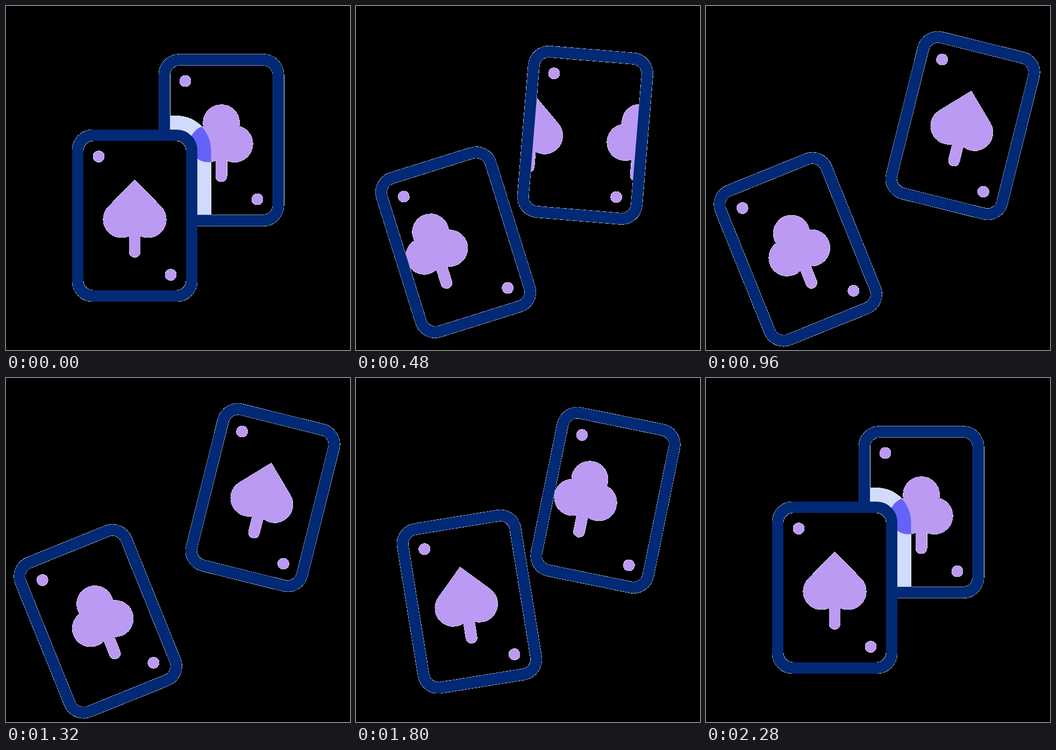
An HTML page with a canvas for the animation above (2360 ms loop, 640 px wide and 640 px high).

```html
<!DOCTYPE html>
<html lang="en">
<head>
<meta charset="utf-8">
<title>Two playing cards</title>
<style>
  html, body { margin: 0; height: 100%; overflow: hidden; background: #000; }
  canvas { display: block; width: 100vw; height: 100vh; }
</style>
</head>
<body>
<canvas id="stage" width="640" height="640"></canvas>
<script>
const SIZE = 640;
const ctx = document.getElementById('stage').getContext('2d', { willReadFrequently: true });

const NAVY = '#022975', LILAC = '#bb9af3', PALE = '#d1daff', VIOLET = '#6462f8';
const LOOP = 2360, STEP = 40, LAST = 2280;
const LINE = 21, SPREAD = 25.5;

// Card outline grown by g on each side of the middle of its border
function cardPath(g) {
  const p = new Path2D();
  p.roundRect(-106 - g, -149.5 - g, 212 + 2 * g, 299 + 2 * g, 28 + g);
  return p;
}

function addCircle(p, x, y, r) {
  p.moveTo(x + r, y);
  p.arc(x, y, r, 0, Math.PI * 2);
}

// Two lower lobes and a stem, shared by both suits
function suitBase() {
  const p = new Path2D();
  addCircle(p, -24.7, 7, 34);
  addCircle(p, 24.7, 7, 34);
  p.roundRect(-10.5, 0, 21, 77.5, 10.5);
  return p;
}

const club = suitBase();
addCircle(club, 0, -32, 34);

const spade = suitBase();
spade.moveTo(0, -66.3);
spade.lineTo(48.7, -17);
spade.lineTo(0, 20);
spade.lineTo(-48.7, -17);
spade.closePath();

const dots = new Path2D();
addCircle(dots, -67, -110, 10.5);
addCircle(dots, 67, 110, 10.5);

const border = cardPath(0);
const shade = cardPath(LINE / 2 + SPREAD);

const front = {
  x: 239.5, y: 390, dx: -68.4, dy: 62.8, turn: -22, gap: 215,
  move: [80, 720, 1440, 2120], slide: [0, 720, 1200, 1920],
  home: spade, away: club
};
const back = {
  x: 400.6, y: 249.5, dx: 77, dy: -27, turn: 14, gap: 200,
  move: [200, 840, 1560, 2240], slide: [120, 840, 1320, 2040],
  home: club, away: spade
};

function ease(t, from, to, power) {
  const u = Math.min(1, Math.max(0, (t - from) / (to - from)));
  return u < .5 ? Math.pow(2 * u, power) / 2 : 1 - Math.pow(2 - 2 * u, power) / 2;
}

const offset = (card, t) =>
  ease(t, card.move[0], card.move[1], 3) - ease(t, card.move[2], card.move[3], 3);

function pose(card, t) {
  const p = offset(card, t);
  ctx.setTransform(1, 0, 0, 1, card.x + card.dx * p, card.y + card.dy * p);
  ctx.rotate(card.turn * p * Math.PI / 180);
}

function fill(path, color) {
  ctx.fillStyle = color;
  ctx.fill(path);
}

// Suits pass from left to right, once on the way out and once on the way back
function drawSuits(card, t, color) {
  const [a, b, c, d] = card.slide;
  const returning = t >= c;
  const s = returning ? ease(t, c, d, 2.5) : ease(t, a, b, 2.5);
  const leaving = returning ? card.away : card.home;
  const coming = returning ? card.home : card.away;
  for (const [path, x] of [[leaving, s], [coming, s - 1]]) {
    ctx.save();
    ctx.translate(x * card.gap, 0);
    fill(path, color);
    ctx.restore();
  }
}

function drawBorder() {
  ctx.strokeStyle = NAVY;
  ctx.lineWidth = LINE;
  ctx.stroke(border);
}

function drawBack(t) {
  ctx.save();
  pose(back, t);
  ctx.clip(border);
  pose(front, t);
  fill(shade, PALE);
  pose(back, t);
  fill(dots, LILAC);
  drawSuits(back, t, LILAC);

  pose(front, t);
  ctx.clip(shade);
  pose(back, t);
  ctx.globalAlpha = 1 - offset(back, t);
  drawSuits(back, t, VIOLET);
  ctx.restore();

  pose(back, t);
  drawBorder();
}

function drawFront(t) {
  pose(front, t);
  ctx.save();
  ctx.globalCompositeOperation = 'destination-out';
  fill(border, '#000');
  ctx.restore();

  ctx.save();
  ctx.clip(border);
  fill(dots, LILAC);
  drawSuits(front, t, LILAC);
  ctx.restore();
  drawBorder();
}

// Soft edge pixels blend into white, empty ones turn black
function applyMatte() {
  const image = ctx.getImageData(0, 0, SIZE, SIZE);
  const px = image.data;
  for (let i = 0; i < px.length; i += 4) {
    const alpha = px[i + 3];
    if (alpha > 8 && alpha < 255) {
      for (let k = i; k < i + 3; k++) px[k] = 255 + (px[k] - 255) * alpha / 255;
    } else if (alpha < 255) {
      px[i] = px[i + 1] = px[i + 2] = 0;
    }
    px[i + 3] = 255;
  }
  ctx.putImageData(image, 0, 0);
}

function render(t) {
  ctx.setTransform(1, 0, 0, 1, 0, 0);
  ctx.clearRect(0, 0, SIZE, SIZE);
  drawBack(t);
  drawFront(t);
  applyMatte();
}

const start = performance.now();
let shown = -1;
function tick() {
  const elapsed = (performance.now() - start) % LOOP;
  const t = Math.min(LAST, Math.floor(elapsed / STEP) * STEP);
  if (t !== shown) render(shown = t);
  requestAnimationFrame(tick);
}
tick();
</script>
</body>
</html>
```
